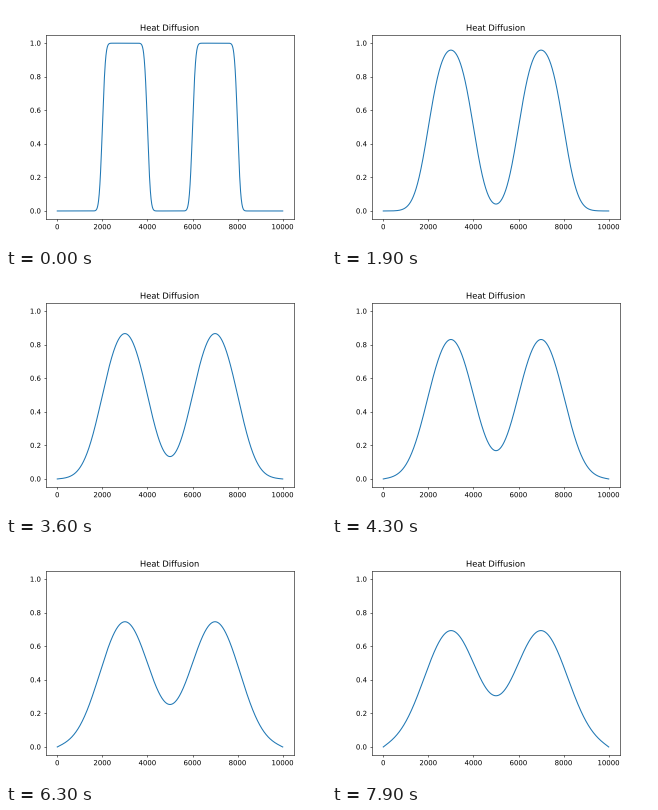
Recreate the animation shown at these times as a matplotlib script. Size 320 px wide and 240 px high, loop 8000 ms.

```python
import math

import numpy as np
import matplotlib.pyplot as plt
from matplotlib.animation import FuncAnimation
from matplotlib.patheffects import Normal

LENGTH = 10000
FRAMES = 80
INTERVAL = 100
SPREAD = 12000  # variance added by diffusion per frame

# Hot blocks, plus negative mirror images that hold both ends at zero
BLOCKS = [(2000, 4000, 1), (6000, 8000, 1),
          (-4000, -2000, -1), (12000, 14000, -1)]

erf = np.vectorize(math.erf, otypes=[float])
x = np.linspace(0, LENGTH, 1001)


def temperature(frame):
    width = math.sqrt(2 * SPREAD * (frame + 1))
    u = np.zeros_like(x)
    for left, right, sign in BLOCKS:
        u += sign * 0.5 * (erf((x - left) / width) - erf((x - right) / width))
    return u


fig, ax = plt.subplots(figsize=(6.4, 4.8), dpi=50)
fig.subplots_adjust(bottom=0.111)
ax.set_title("Heat Diffusion")
ax.set_xlim(-0.05 * LENGTH, 1.05 * LENGTH)
ax.set_ylim(-0.05, 1.05)
line, = ax.plot(x, temperature(0))

# Draw text as outlines, free of pixel hinting
for text in [ax.title, *ax.get_xticklabels(), *ax.get_yticklabels()]:
    text.set_path_effects([Normal()])


def update(frame):
    line.set_ydata(temperature(frame))
    return line,


anim = FuncAnimation(fig, update, frames=FRAMES, interval=INTERVAL,
                     repeat=True, repeat_delay=0)
plt.show()
```
